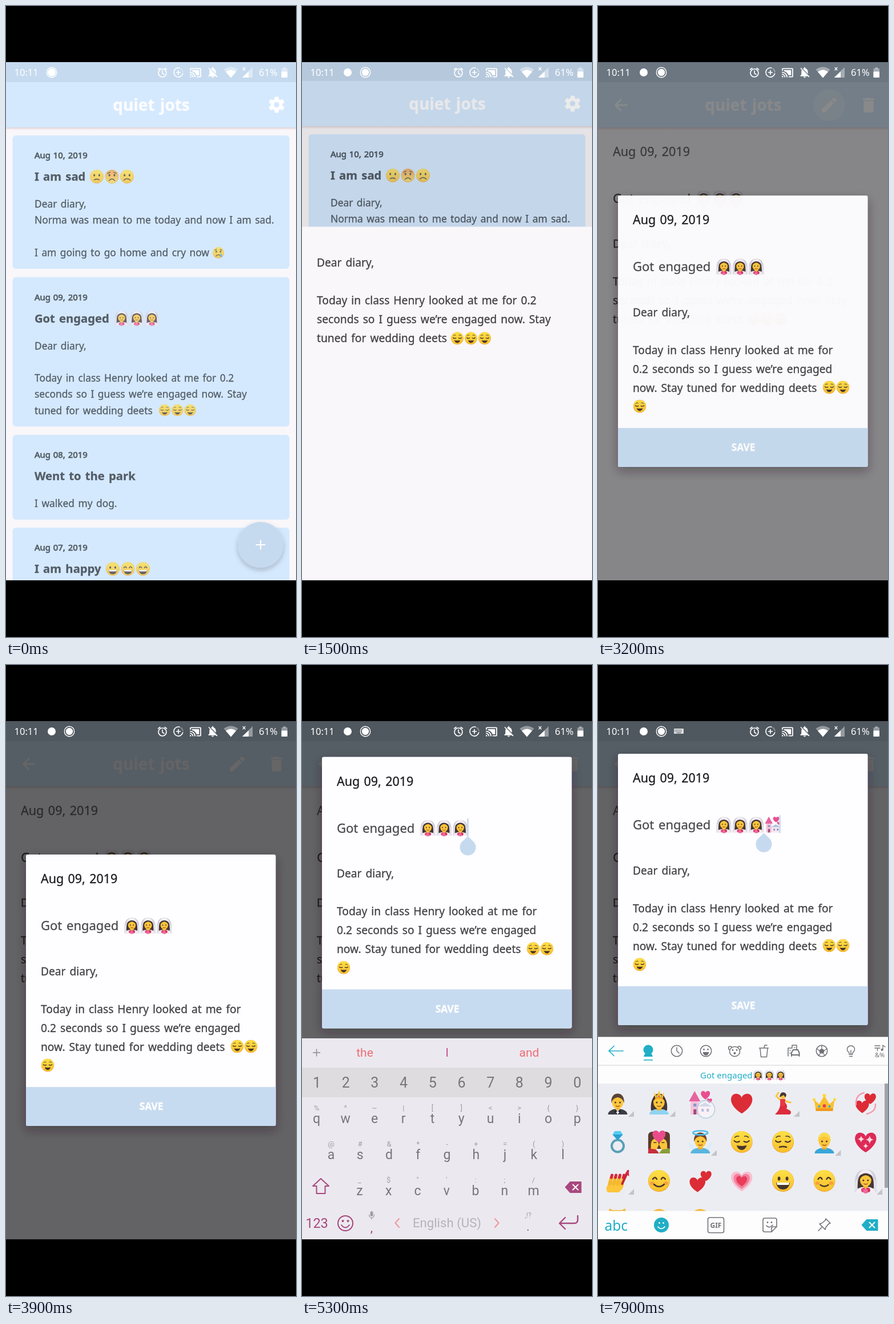
Write an HTML page that moves like this. It is 508 by 1102 pixels and loops after 8000 ms.

```html
<!DOCTYPE html>
<html lang="en">
<head>
<meta charset="utf-8">
<title>Diary</title>
<style>
html, body { margin: 0; width: 100%; height: 100%; overflow: hidden; background: #000; }
svg { display: block; width: 100%; height: 100%; }
text { font-family: "Noto Sans", "Open Sans", sans-serif; white-space: pre; stroke-width: 0; }
.note text { word-spacing: 2px; stroke-width: .3px; stroke-linejoin: round; }
.note .semi { stroke-width: .75px; word-spacing: 1px; }
.key text { font-family: Roboto, sans-serif; }
.b { font-weight: 700; }
.m { text-anchor: middle; }
</style>
</head>
<body>
<svg id="stage" viewBox="0 0 508 1102" preserveAspectRatio="none"></svg>
<script>
const APP = 'quiet jots';
const SKY = '#d5e9fe', BAR = '#c6daef', PAPER = '#f9f7fa';
const PLUM = '#a8477f', TEAL = '#20aec6', GRAY = '#77757a';

// Drawing helpers
const rect = (x, y, w, h, fill, more = '') => `<rect x="${x}" y="${y}" width="${w}" height="${h}" fill="${fill}" ${more}/>`;
const oval = (x, y, rx, ry, fill) => `<ellipse cx="${x}" cy="${y}" rx="${rx}" ry="${ry}" fill="${fill}"/>`;
const dot = (x, y, r, fill) => oval(x, y, r, r, fill);
const path = (d, fill) => `<path d="${d}" fill="${fill}"/>`;
const line = (d, stroke, w = 1.5, more = '') => `<path d="${d}" fill="none" stroke="${stroke}" stroke-width="${w}" stroke-linecap="round" stroke-linejoin="round" ${more}/>`;
const ring = (x, y, r, stroke, w = 1.5) => `<circle cx="${x}" cy="${y}" r="${r}" fill="none" stroke="${stroke}" stroke-width="${w}"/>`;
const text = (x, y, size, fill, s, cls = '') => `<text x="${x}" y="${y}" font-size="${size}" fill="${fill}" stroke="${fill}" class="${cls}">${s.replace('&', '&amp;').replace('<', '&lt;')}</text>`;
const group = (s, more = '') => `<g ${more}>${s}</g>`;
const at = (x, y, k, s) => group(s, `transform="translate(${x} ${y}) scale(${k})"`);
const icon = (x, y, k, d, fill = '#fff') => at(x, y, k, group(path(d, fill), 'transform="translate(-12 -12)"'));

// Emoji, each drawn in a 40 unit box around its centre
const HEART = 'M0 17C-24 2-19-15-9-15-4-15 0-11 0-8 0-11 4-15 9-15 19-15 24 2 0 17Z';
const INK = '#46362c', SKIN = '#fcc53a', HAIR = '#453634';
const heart = (x, y, k, fill = '#dc2c36') => at(x, y, k, path(HEART, fill));
const openEyes = oval(-7, -4, 2.4, 3.4, INK) + oval(7, -4, 2.4, 3.4, INK);
const shutEyes = line('M-13-2Q-9 2-4-1M4-1Q9 2 13-2', INK, 2.2);
const happyEyes = line('M-11-3Q-7-9-4-3M4-3Q7-9 11-3', INK, 2.4);
const brows = line('M-12-8Q-9-11-5-10M12-8Q9-11 5-10', INK, 1.6);
const blush = oval(-12, 4, 4, 3, '#f7a13b') + oval(12, 4, 4, 3, '#f7a13b');
const face = (eyes, mouth, fill = 'url(#sun)') => dot(0, 0, 19, '#eba52c') + dot(0, -.5, 18.4, fill) + eyes + mouth;
const smile = line('M-9 6Q0 14 9 6', INK, 2.4);
const frown = line('M-8 11Q0 2 8 11', INK, 2.4);
const grin = path('M-12 3H12Q10 15 0 15T-12 3Z', INK) + path('M-11 3H11L10 7H-10Z', '#fff');
const person = (back, body, hair, front = '') => back + path('M-17 20C-17 7 17 7 17 20Z', body) +
  rect(-4, 6, 8, 7, '#eeb033') + oval(0, -2, 10, 12, SKIN) +
  path('M-11 0C-14-22 14-22 11 0 9-7 5-9 0-10-5-9-9-7-11 0Z', hair) +
  dot(-4, -1, 1.5, INK) + dot(4, -1, 1.5, INK) + line('M-3 5Q0 7 3 5', '#9c3b2d', 1.5) + front;
const longHair = path('M-14 13C-18-25 18-25 14 13Z', HAIR);
const crown = (k, y) => at(0, y, k, path('M-15 12L-18-6-9 2 0-13 9 2 18-6 15 12Z', '#fbc02d') + rect(-15, 9, 30, 5, '#f19a1d') +
  dot(0, -13, 3, '#fdd835') + dot(-18, -6, 2.5, '#fdd835') + dot(18, -6, 2.5, '#fdd835') + dot(0, 5, 3, '#e5404d') + dot(-9, 6, 2, '#38a7d8') + dot(9, 6, 2, '#38a7d8'));
const star = (x, y, r) => at(x, y, r, path('M0-1Q.15-.15 1 0 .15.15 0 1-.15.15-1 0-.15-.15 0-1Z', '#ffd9e0'));

const emoji = {
  sad: face(openEyes, line('M-7 9Q0 5 7 9', INK, 2.4)),
  worried: face(openEyes, frown + line('M-12-9L-5-12M12-9L5-12', INK, 2), 'url(#dusk)'),
  gloomy: face(openEyes, line('M-9 10Q0 1 9 10', INK, 2.4)),
  cry: face(openEyes, frown + path('M9 2Q2 14 9 15 16 14 9 2Z', '#4aa7e8') + line('M-12-9L-6-12M12-9L6-12', INK, 2)),
  relief: face(shutEyes + brows, path('M-9 6Q0 8 9 6 6 14 0 14T-9 6Z', INK)),
  pensive: face(shutEyes + brows, line('M-6 9Q0 7 6 9', INK, 2.4)),
  blush: face(happyEyes, blush + smile),
  soft: face(happyEyes, blush + line('M-7 7Q0 12 7 7', INK, 2.4)),
  grin: face(openEyes, grin),
  laugh: face(happyEyes, grin),
  bride: person(path('M-18 20C-22-8-16-20 0-20S22-8 18 20Z', '#d3cfdb') + longHair, '#f1eef4', HAIR,
    path('M-13-7C-11-24 11-24 13-7Q0-20-13-7Z', '#f1eef5') + path('M-18 20Q-13 10-14-4L-18 0-20 20ZM18 20Q13 10 14-4L18 0 20 20Z', '#e4e0ea') +
    dot(-4, 16, 4, '#e8447f') + dot(4, 16, 4, '#d92f54') + dot(0, 18, 4, '#ef6a9c')),
  groom: person('', '#3b3d46', '#5a4336', path('M-5 12L0 20 5 12Z', '#fff') + path('M-5 11L0 14 5 11V17L0 14-5 17Z', '#222')),
  princess: person(longHair, '#8fd3f2', HAIR, crown(.45, -14)),
  blond: person('', '#38a6da', '#fbd94b'),
  angel: person(path('M-8 16Q-22 12-20-1-12 4-8 16ZM8 16Q22 12 20-1 12 4 8 16Z', '#d9eefa'), '#59b5df', '#70452d',
    `<ellipse cy="-16" rx="13" ry="3.5" fill="none" stroke="#51bde8" stroke-width="2.5"/>`),
  castle: rect(-17, -3, 14, 23, '#f3c3da') + rect(-3, 5, 21, 15, '#fae6ef') + path('M-20-3L-10-21 0-3Z', '#e7639f') +
    path('M-4 6L8-1 20 6Z', '#b3c0dd') + rect(-12, 11, 5, 9, '#a24a78') + rect(-12, 1, 5, 5, '#8297cc') +
    rect(2, 10, 4, 5, '#8297cc') + rect(11, 10, 4, 5, '#8297cc') + heart(9, -14, .46, '#e94f8f') + heart(16, -4, .26, '#e94f8f'),
  heart: heart(0, 0, 1.08),
  dancer: path('M-2-5Q10 2 6 10 18 14 12 20H-14Q-6 12-5 4Z', '#dc2c3d') + line('M-3-4L-12-12-8-18M2-4L13-1', SKIN, 3) +
    path('M-5-7H4L3 5H-5Z', '#e53945') + dot(0, -12, 5, SKIN) + path('M-6-10Q-5-21 3-18 8-15 4-10L1-14Z', HAIR),
  crown: crown(1, 0),
  orbit: heart(-6, 6, .68) + heart(8, -8, .58) + line('M-17 3Q-18-14-3-18M17 2Q18 15 2 19', '#f59bb1', 2.5),
  ring: ring(0, 7, 10.5, '#5a9fb8', 4) + path('M-9-13L-5-19H5L9-13 0-3Z', '#55cdf0') + path('M-9-13H9L0-3Z', '#2c9fd0'),
  kiss: path('M-19 12V-12Q-18-19-9-18L0-8 9-18Q18-19 19-12V12Z', '#5b3a2e') + path('M-19 20V12Q-8 6 0 20Z', '#c62f3b') + path('M19 20V12Q8 6 0 20Z', '#8a9c3a') +
    path('M-14 12Q-16-6-5-6L0 4-4 13ZM14 12Q16-6 5-6L0 4 4 13Z', SKIN) + line('M-9 1H-5M9 1H5', INK, 1.6) + heart(0, -10, .66, '#ea4c8b'),
  sparkle: heart(0, 0, 1.08, '#dd2a56') + star(-8, -5, 6) + star(7, -4, 7) + star(0, 7, 5),
  nails: path('M-20 14Q-18 2-7-1L9 1Q14 10 2 20H-18Z', SKIN) + [-14, -7, 0, 7].map(x => line(`M${x} 5L${x + 3}-6`, '#f4b72e', 6) +
    line(`M${x + 3}-6L${x + 4}-10`, '#d9273b', 5)).join('') + line('M8 5L18-17', '#c42336', 4) + path('M13-13L19-20 20-8Z', '#d9273b'),
  hearts: heart(-5, 6, .8) + heart(10, -9, .55),
  grow: heart(0, 0, 1.08, '#f8bfd0') + heart(0, 0, .82, '#f2809d') + heart(0, 0, .55, '#e83c5a'),
};
const emo = (name, x, y, size) => `<use href="#e-${name}" transform="translate(${x} ${y}) scale(${size / 40})"/>`;
const trio = (names, x, step, y, size) => names.map((n, i) => emo(n, x + i * step, y, size)).join('');
const brides = ['bride', 'bride', 'bride'], reliefs = ['relief', 'relief', 'relief'];

// App pages
const header = rect(0, 90, 508, 43, BAR) + rect(0, 133, 508, 79, SKY) + rect(0, 212, 508, 5, 'url(#fall)') +
  text(254.5, 183, 28, '#fcfcfe', APP, 'b m');
const gear = [0, 60, 120].map(a => rect(-3.6, -14, 7.2, 28, '#fff', `rx="1.5" transform="rotate(${a})"`)).join('');
const lines = (x, y, size, gap, fill, list) => list.map((s, i) => text(x, y + i * gap, size, fill, s)).join('');
const ENTRY = ['Dear diary,', '', 'Today in class Henry looked at me for 0.2', 'seconds so I guess we’re engaged now. Stay', 'tuned for wedding deets'];

function card(y, h, date, title, body) {
  const ink = '#535d67';
  return rect(11.5, y, 485, h, SKY, 'rx="6"') + text(50, y + 40, 14.9, ink, date, 'semi') + text(50, y + 79, 20.2, ink, title, 'b') +
    lines(50, y + 126, 17.35, 28.3, ink, body);
}

const listPage = rect(0, 90, 508, 960, PAPER) + header + at(474, 172.5, 1, gear + dot(0, 0, 10.5, '#fff') + dot(0, 0, 4.8, SKY)) +
  card(226, 233, 'Aug 10, 2019', 'I am sad', ['Dear diary,', 'Norma was mean to me today and now I am sad.', '', 'I am going to go home and cry now']) +
  card(473.5, 261, 'Aug 09, 2019', 'Got engaged', ENTRY) +
  card(749, 148, 'Aug 08, 2019', 'Went to the park', ['I walked my dog.']) +
  card(911, 140, 'Aug 07, 2019', 'I am happy', []) +
  group(trio(['sad', 'worried', 'gloomy'], 159, 26.5, 298, 25) + emo('cry', 372, 431, 21) + trio(brides, 202.5, 26.5, 545, 25) +
    trio(reliefs, 278, 22.3, 706, 21.5) + trio(['grin', 'laugh', 'laugh'], 187, 26.5, 983, 25), 'opacity=".75"') +
  group(dot(446, 941, 40, BAR), 'filter="url(#lift)"') + line('M438.5 941H453.5M446 933.5V948.5', '#fff', 2.2);

const EDIT = 'M3 17.25V21h3.75L17.81 9.94l-3.75-3.75zM20.71 7.04a1 1 0 0 0 0-1.41l-2.34-2.34a1 1 0 0 0-1.41 0l-1.83 1.83 3.75 3.75z';
const BIN = 'M6 19a2 2 0 0 0 2 2h8a2 2 0 0 0 2-2V7H6zM19 4h-3.5l-1-1h-5l-1 1H5v2h14z';
const BACK = 'M20 11H7.83l5.59-5.59L12 4l-8 8 8 8 1.41-1.41L7.83 13H20z';
const detailPage = rect(0, 90, 508, 960, PAPER) + header + icon(40, 173, 1.43, BACK) +
  `<circle id="ripple" cx="405" cy="173" r="28" fill="#fff"/>` + icon(405, 173, 1.43, EDIT) + icon(474, 173, 1.43, BIN) +
  text(26, 261.5, 21.5, '#6a686b', 'Aug 09, 2019') + text(26, 344, 22, '#474548', 'Got engaged') +
  lines(26, 422, 19.2, 33, '#424043', ENTRY) +
  group(trio(brides, 185, 28.5, 336, 27), 'opacity=".82"') + trio(reliefs, 272, 24, 547, 23);

const dialog = group(rect(35, 331, 437.5, 474, '#fefdff', 'rx="3"'), 'filter="url(#deep)"') +
  path('M35 737H472.5V802Q472.5 805 469.5 805H38Q35 805 35 802Z', '#c7dbf0') + text(254.5, 777, 17.3, '#fff', 'SAVE', 'b m') +
  text(61, 381, 21.4, '#1b1a1c', 'Aug 09, 2019') + text(61, 463, 22, '#4a494c', 'Got engaged') +
  lines(61, 541.5, 19.2, 33, '#424145', ['Dear diary,', '', 'Today in class Henry looked at me for', '0.2 seconds so I guess we’re engaged', 'now. Stay tuned for wedding deets']) +
  trio(brides, 220.5, 28.4, 455, 27) + trio(['relief', 'relief'], 405, 24, 666, 23.5) + emo('relief', 73, 699, 23.5) +
  group(emo('castle', 306, 455, 27), 'id="castle"') +
  rect(-1.3, 438.5, 2.6, 31, BAR, 'id="caret"') +
  group(path('M0-19.5L9.9-9.9A14 14 0 1 1-9.9-9.9Z', BAR), 'id="handle" transform="translate(290.5 489)"');

// Letter keyboard
const chars = (s, x, step, y, size, fill) => [...s].map((c, i) => text(x + i * step, y, size, fill, c, 'm')).join('');
const keyRow = (s, hints, x, y) => chars(s, x, 50.75, y, 23, GRAY) + chars(hints, x, 50.75, y - 22, 13, '#a09da3');
const erase = (x, y, fill) => at(x, y, 1, path('M-15 0L-6-10H14V10H-6Z', fill) + line('M-1-4.5L8 4.5M8-4.5L-1 4.5', '#fff', 2));
const letters = rect(0, 652, 508, 360, '#ebe9ef') + rect(0, 703, 508, 52, '#dfdce0') +
  line('M19.5 677H31.5M25.5 671V683', '#8b888e', 1.4) + text(110, 684, 21, '#ef6d76', 'the', 'm') + text(254, 684, 21, '#c4528e', 'I', 'm') +
  text(398, 684, 21, '#ef6d76', 'and', 'm') + chars('1234567890', 26, 50.7, 738, 25, GRAY) +
  keyRow('qwertyuiop', '%^~|[]<>{}', 25.5, 800) + keyRow('asdfghjkl', '@#&*-+=()', 51, 863) + keyRow('zxcvbnm', '_$"\':;/', 101, 925.5) +
  line('M33 897L47 910H40.5V923H25.5V910H19Z', PLUM, 2) + erase(475.5, 912, PLUM) +
  text(26, 983, 23.5, PLUM, '123', 'm') + ring(76, 975, 13, PLUM, 2) + dot(71.5, 971, 2, PLUM) + dot(80.5, 971, 2, PLUM) + line('M69 978Q76 987 83 978', PLUM, 2) +
  rect(119.5, 954, 5, 9, '#a09da3', 'rx="2.5"') + line('M117.5 960Q118 965.5 122 965.5T126.5 960M122 965.5V968', '#a09da3', 1.2) +
  text(122, 990, 22, PLUM, ',', 'm') + text(396, 988, 20, PLUM, '.', 'm') + text(396, 965, 12, '#a09da3', ',!?', 'm') +
  line('M170 967L163.5 974.5 170 982M338 967L344.5 974.5 338 982', '#f0979c', 2) + text(254, 982, 22.2, '#b6b3b9', 'English (US)', 'm') +
  line('M483 962V969Q483 975 477 975H452M461 965L451 975 461 985', PLUM, 2.4);

// Emoji keyboard
const G = '#707176';
const tinyFace = (x, y, c) => dot(x - 3.5, y - 2.5, 1.4, c) + dot(x + 3.5, y - 2.5, 1.4, c);
const tabs = line('M19 674H44M28 665.5L19 674 28 682.5', TEAL, 1.7) + dot(88, 672, 8.5, TEAL) + path('M82 679H94L96 684H80Z', TEAL) + rect(80, 689, 16, 1.6, TEAL) +
  ring(138, 674, 9.7, G) + line('M138 668V674L142 678', G) +
  ring(189, 674, 9.7, G) + tinyFace(189, 674, G) + path('M183.5 676H194.5Q193 682 189 682T183.5 676Z', G) +
  ring(231.5, 669, 3, G) + ring(247.5, 669, 3, G) + `<ellipse cx="239.5" cy="675" rx="9" ry="8.5" fill="#fff" stroke="${G}" stroke-width="1.5"/>` + tinyFace(239.5, 675, G) + dot(239.5, 678, 2, G) +
  line('M284 670L285.5 684.5H295.5L297 670M282.5 669H298.5M291 668L292 664H296', G) +
  line('M333 683V669H340V664H348V671M336 673H337M336 678H337M344 668H345', G) + line('M339 683V677L342 672H350L352.5 677V683M339 681H352.5', G, 2) +
  ring(392, 674, 9.7, G) + path('M392 669.5L397 673 395 678.5H389L387 673Z', G) + line('M392 669V664M397 673L401 670M395 679L398 682M389 679L386 682M387 673L383 670', G, 1.3) +
  line('M440 680V677Q436 674 436.5 670 438 665 443 665T449.5 670Q450 674 446 677V680ZM440.5 683.5H445.5M443 680V673', G, 1.4) +
  line('M485 665H494M485 669H494M489.5 669V674M499 672V664L503 667', G, 1.3) + dot(497.5, 672, 2, G) + text(493.5, 685, 11, G, '&%', 'm');
const rows = ['groom princess castle heart dancer crown orbit', 'ring kiss angel relief pensive blond sparkle', 'nails blush hearts grow grin soft bride'];
const cells = rows.map((r, j) => trio(r.split(' '), 34.5, 72.4, 765 + j * 68, 40)).join('');
const corners = [[0, 0], [1, 0], [4, 0], [2, 1], [5, 1], [0, 2], [6, 2]].map(([i, j]) =>
  path(`M${63 + i * 72.5} ${779 + j * 68}v10h-10z`, '#c3c4c8')).join('');
const picker = rect(0, 649.5, 508, 360, '#fdfdfe') + tabs + rect(0, 698.5, 508, 1, '#cfd0d4') +
  text(179, 721.5, 15, TEAL, 'Got engaged') + trio(brides, 280.5, 19.7, 716, 17.5) + rect(0, 731, 508, 223, '#ecedf2') + cells + corners +
  path('M19 954L20 949 26 952H42L47 949 49 954Z', '#f6b73c') + path('M96 954Q107 946 118 954ZM168 954Q179 946 190 954Z', '#f6b73c') +
  rect(502, 731, 6, 182, '#a2a3a7') + rect(0, 953.5, 508, 50, '#fdfdfe') +
  text(11.5, 988, 24.5, TEAL, 'abc') + dot(111, 978, 13, TEAL) + tinyFace(111, 977, '#fff') + line('M105 981Q111 988 117 981', '#fff', 1.7) +
  rect(192.5, 965, 28, 26.5, 'none', `rx="3" stroke="${G}" stroke-width="1.6"`) + text(206.5, 982.5, 12, G, 'GIF', 'b m') +
  line('M292 966H310Q313 966 313 969V981L304 990H292Q289 990 289 987V969Q289 966 292 966ZM313 981H307Q304 981 304 984V990M295 979Q300 985 306 978', G, 1.6) + tinyFace(300.5, 976, G) +
  line('M399 967L407 975 404 976 399 982 398 986 388 976 392 975 398 970ZM393 981L386 988', G, 1.6) + erase(476.5, 978, TEAL);

// Status bar
const W = '#fff', HALF = 'rgba(255,255,255,.4)';
const BELL = 'M20 18.69L7.84 6.14 5.27 3.49 4 4.76l2.8 2.8C6.28 8.57 6 9.73 6 11v5l-2 2v1h13.73l2 2L21 19.72zM12 22a2 2 0 0 0 2-2h-4a2 2 0 0 0 2 2zM18 14.68V11c0-3.08-1.64-5.64-4.5-6.32V4a1.5 1.5 0 0 0-3 0v.68L8.6 5.24z';
const CAST = 'M21 3H3a2 2 0 0 0-2 2v3h2V5h18v14h-7v2h7a2 2 0 0 0 2-2V5a2 2 0 0 0-2-2zM1 18v3h3a3 3 0 0 0-3-3zM1 14v2a5 5 0 0 1 5 5h2a7 7 0 0 0-7-7zM1 10v2a9 9 0 0 1 9 9h2A11 11 0 0 0 1 10zM5 7v2a13 13 0 0 1 9 8h5V7z';
const status = text(14.5, 122, 16.5, W, '10:11') + dot(80, 116, 7, W) +
  group(ring(0, 116, 8.7, W, 1.4) + dot(0, 116, 6.2, W), 'id="record"') +
  group(rect(133, 111, 17, 9, W, 'rx="1" opacity=".8"') + line('M135 113.5H148M135 116H148', '#4f5a64', 1.4, 'stroke-dasharray=".2 2.4"') + line('M138 118.3H145', '#4f5a64', 1), 'id="keys"') +
  ring(274, 117, 7, W, 1.7) + line('M274 113V117.5L277 119.5M266.5 111L270 108.5M281.5 111L278 108.5', W, 1.6) +
  line('M304 108.3A8 8 0 1 0 309.7 118', W, 1.7) + line('M306.5 109.5A8 8 0 0 1 310 115', HALF, 1.7) + line('M298.5 116H305.5M302 112.5V119.5', W, 1.7) +
  icon(332, 116.5, .9, CAST) + icon(362, 116, .95, BELL) +
  path('M394 125.5L381.5 111Q394 102 406.5 111Z', HALF) + path('M394 125.5L385 115Q394 108 403 115Z', W) +
  path('M414 125V124L432 107V125Z', HALF) + path('M414 125L425 114.5V125Z', W) + line('M415 107.5L419 112M419 107.5L415 112', W, 1.2) +
  text(443, 122, 16.5, W, '61%') + rect(482.5, 109, 10.5, 16, HALF, 'rx="1"') + rect(485.5, 107, 4.5, 3, HALF) + rect(482.5, 114.5, 10.5, 10.5, W, 'rx="1"');

const shadow = (id, dy, blur, a) => `<filter id="${id}" x="-20%" y="-20%" width="140%" height="150%"><feDropShadow dx="0" dy="${dy}" stdDeviation="${blur}" flood-color="#201820" flood-opacity="${a}"/></filter>`;
const fade = (id, a, b) => `<linearGradient id="${id}" x2="0" y2="1"><stop stop-color="${a}"/><stop offset="1" stop-color="${b}"/></linearGradient>`;
const defs = Object.entries(emoji).map(([k, s]) => group(s, `id="e-${k}"`)).join('') +
  fade('sun', '#fde047', '#f9bf2d') + fade('dusk', '#ef9a45', '#fad94d') + fade('fall', 'rgba(130,70,80,.2)', 'rgba(130,70,80,0)') +
  shadow('lift', 4, 4, .25) + shadow('deep', 7, 9, .38) + `<clipPath id="reveal"><rect id="window" width="508" height="1102"/></clipPath>`;

const stage = document.getElementById('stage');
stage.innerHTML = `<defs>${defs}</defs>` +
  group(listPage, 'id="list" class="note"') + rect(0, 90, 508, 920, '#000', 'id="shade"') +
  group(group(detailPage, 'id="detail" class="note"'), 'clip-path="url(#reveal)"') +
  rect(0, 90, 508, 920, '#000', 'id="dim"') + group(dialog, 'id="dialog" class="note"') +
  group(letters, 'id="letters" class="key"') + group(picker, 'id="picker"') +
  group(dot(0, 0, 15, HALF) + ring(0, 0, 15.5, 'rgba(170,195,222,.65)', 1.8), 'id="touch"') +
  status + rect(0, 0, 508, 98, '#000') + rect(0, 1003, 508, 99, '#000');

const part = {};
stage.querySelectorAll('[id]').forEach(n => part[n.id] = n);
const set = (id, k, v) => part[id].setAttribute(k, v);
const show = (id, on) => set(id, 'opacity', +on);
const move = (id, x, y) => set(id, 'transform', `translate(${x} ${y})`);
const ramp = (t, from, span) => Math.max(0, Math.min(1, (t - from) / span));
const ease = u => u * u * (3 - 2 * u);

function draw(t) {
  move('record', 80 + 31 * ease(ramp(t, 0, 400)), 0);
  show('keys', t >= 5500);

  const open = ramp(t, 1400, 300), slide = ease(open);
  move('list', 0, -8 * slide);
  show('shade', .31 * slide);
  set('window', 'y', 1003 - 910 * (1 - (1 - open) ** 2.8));
  move('detail', 0, 45 * (1 - slide));
  show('ripple', .25 * ramp(t, 2800, 200) * (1 - ramp(t, 3200, 200)));

  show('dim', .6 * ramp(t, 3080, 155));
  show('dialog', ramp(t, 3080, 124));
  const picking = t >= 6600, typed = t >= 7900;
  move('dialog', 0, picking ? -176 : t >= 5300 ? -170.5 : 0);
  show('castle', typed);
  move('caret', typed ? 318.5 : 290.5, 0);
  show('caret', t >= 5000 && (typed || t % 1000 < 500));
  show('handle', ramp(t, 4950, 215));

  move('letters', 0, 352 * (1 - ramp(t, 5100, 200)) ** 2);
  show('letters', t > 5100);
  show('picker', picking);
  const tapTitle = t >= 5000 && t < 5200;
  show('touch', tapTitle || t >= 7800);
  move('touch', tapTitle ? 287 : 189, tapTitle ? 457 : 776);
}

const start = performance.now();
function tick() {
  const t = (performance.now() - start) % 8000;
  draw(Math.floor(t / 100) * 100);
  requestAnimationFrame(tick);
}
tick();
</script>
</body>
</html>
```
